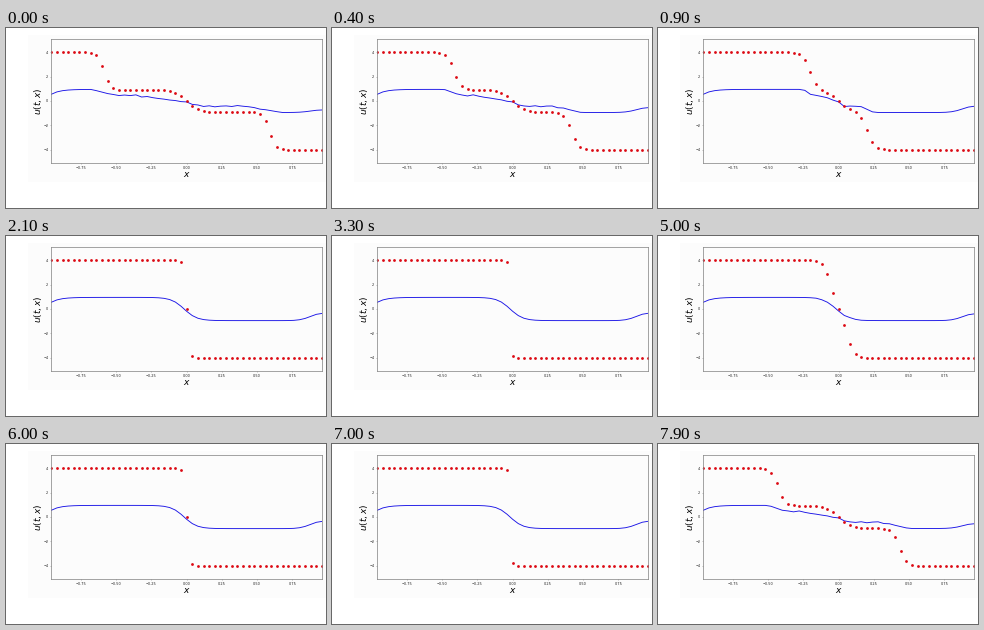
A matplotlib script for the animation above (8000 ms loop, 320 px wide and 180 px high).

```python
import numpy as np
import matplotlib.pyplot as plt
from matplotlib.animation import FuncAnimation
from matplotlib.patches import Rectangle

plt.rcParams.update({"font.family": "DejaVu Sans", "mathtext.fontset": "dejavusans"})

W, H, DPI = 320, 180, 72
FRAMES, INTERVAL = 80, 100
PERIOD = 37.63        # frames per run of the wave
FRONT, SPEED = 0.586, 0.041
NU, DT = 0.041, 0.0174
SUB, SAVE = 100, 10   # solver steps per frame, steps per stored state

x = np.linspace(-0.96, 0.96, 49)
ripple = np.random.default_rng(4).normal(0, 0.03, x.size)


def solve():
    """Viscous Burgers equation with two fronts running to the centre."""
    g = np.linspace(-1, 1, 401)
    dx, dt = g[1] - g[0], DT / SUB
    outer = 0.5 * (1 + np.tanh(22 * (np.abs(g) - FRONT)))
    inner = -0.97 * np.tanh(10 * g) * np.cos(0.9 * g)
    u = inner * (1 - outer) - 4 * np.sign(g) * outer
    u[0], u[-1] = 4, -4
    states = []
    for i in range(38 * SUB + 1):
        if i % SAVE == 0:
            states.append(np.interp(x, g, u))
        flux = 0.5 * u**2
        u[1:-1] += dt * (NU * (u[2:] - 2 * u[1:-1] + u[:-2]) / dx**2
                         - (flux[2:] - flux[:-2]) / (2 * dx))
    return states


STATES = solve()

# Key points of the blue curve between the fronts, s = x / front
KEY_S = [-1.15, -0.85, -0.7, -0.3, 0, 0.2, 0.65, 0.9, 1.15]
KEY_U = [0.95, 0.42, 0.5, 0.2, -0.12, -0.42, -0.4, -0.65, -0.94]


def dots_at(ph):
    """Wave state; late in the run the shock slips half a cell left."""
    u = STATES[int(round(ph * SUB / SAVE))]
    slip = 1 / (1 + np.exp(-(ph - 29) / 0.8))
    return (1 - slip) * u - slip * 4 * np.tanh((x + 0.02) / 0.0102)


def curve_at(ph):
    """Bumpy slope squeezed by the fronts into one smooth step."""
    s = x / max(FRONT - SPEED * ph, 0.12)
    slope = np.interp(s, KEY_S, KEY_U) + ripple * (np.abs(s) < 0.9)
    step = -0.95 * np.tanh((x + 0.018) / 0.09)
    k = np.clip((ph - 9) / 4, 0, 1)
    left = 0.42 * np.exp(-(x + 0.96) / 0.06)
    right = (0.63 - 0.41 * np.exp(-ph / 6)) * np.exp(-((0.96 - x) / 0.11) ** 2)
    return ((1 - k) * slope + k * step) * (1 - left - right)


fig = plt.figure(figsize=(W / DPI, H / DPI), dpi=DPI, facecolor="white")
fig.add_artist(Rectangle((22 / W, 1 - 154 / H), 298 / W, 147 / H,
                         color="#fcfcfc", lw=0, zorder=-1))

L, R, T, B = 45.3, 316.0, 10.9, 135.1
ax = fig.add_axes([L / W, 1 - B / H, (R - L) / W, (B - T) / H], facecolor="none")
ax.set(xlim=(-0.96, 0.96), ylim=(-5.08, 5.08))
ax.set_xticks(np.arange(-0.75, 0.76, 0.25))
ax.set_yticks([-4, -2, 0, 2, 4])
ax.xaxis.set_major_formatter("{x:.2f}")
ax.tick_params(labelsize=3.5, width=0.5, length=1.2, pad=1.6,
               color="#808080", labelcolor="#222222")
for spine in ax.spines.values():
    spine.set(linewidth=0.7, color="#808080")
fig.text(180.5 / W, 1 - 146.5 / H, "$x$", size=9, ha="center", va="center")
fig.text(32 / W, 1 - 73 / H, "$u(t, x)$", size=9, rotation=90,
         ha="center", va="center")

curve, = ax.plot([], [], color="#1a14e6", lw=0.9)
dots, = ax.plot([], [], "o", color="#dc0a14", ms=2.8, mew=0)


def draw(n):
    ph = n % PERIOD
    curve.set_data(x, curve_at(ph))
    dots.set_data(x, dots_at(ph))
    return curve, dots


anim = FuncAnimation(fig, draw, frames=FRAMES, interval=INTERVAL,
                     repeat=True, repeat_delay=0)
plt.show()
```
